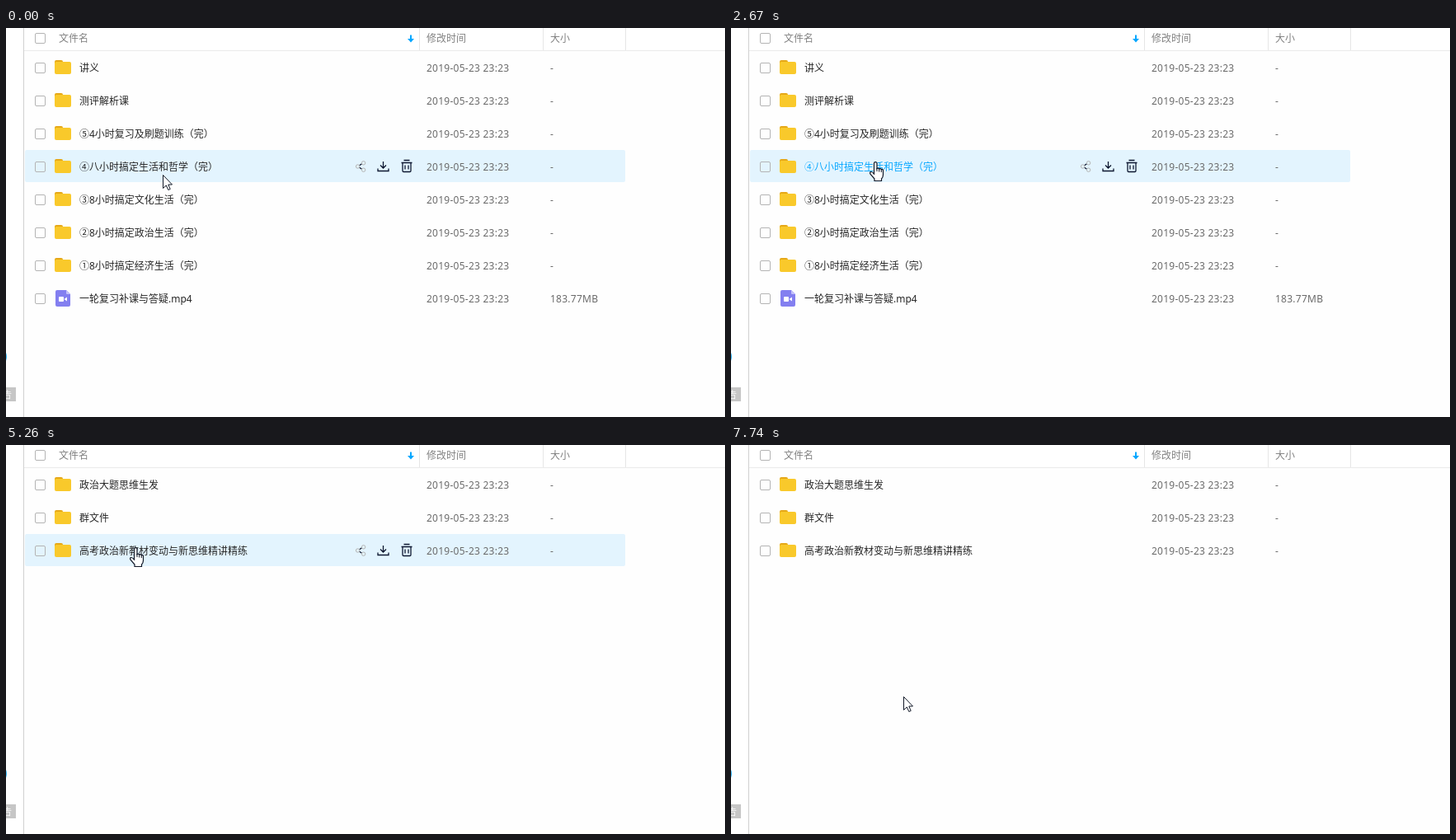
Recreate the animation shown at these times as an HTML page with a canvas. Size 872x472 px, loop 8 s.

```html
<!DOCTYPE html>
<html lang="zh-CN">
<head>
<meta charset="utf-8">
<style>
html, body { margin: 0; width: 100%; height: 100%; overflow: hidden; background: #fff; }
canvas { display: block; }
</style>
</head>
<body>
<canvas id="stage" width="872" height="472"></canvas>
<script>
const ctx = document.getElementById('stage').getContext('2d', { alpha: false });
const LOOP = 8000;
const FONT = '"Noto Sans", "Noto Sans CJK SC", "Noto Sans CJK", sans-serif';
const BLUE = '#06a7ff', GREY = '#6b6b6b', INK = '#0d1730';

// One line per entry; entries with a size are videos, the others folders.
const parse = text => text.trim().split('\n').map(line => {
  const [name, size] = line.split('|');
  return { name, size };
});
const course = parse(`
讲义
测评解析课
⑤4小时复习及刷题训练（完）
④八小时搞定生活和哲学（完）
③8小时搞定文化生活（完）
②8小时搞定政治生活（完）
①8小时搞定经济生活（完）
一轮复习补课与答疑.mp4|183.77MB`);
const culture = parse(`
8.mp4|682.07MB
7.建设社会主义文化强国专题讲解.mp4|646.76MB
6.弘扬和培育民族精神专题讲解.mp4|604.60MB
5.中华文化与民族复兴专题讲解.mp4|620.83MB
4.文化创新专题讲解 .mp4|238.16MB
3.文化的继承与发展专题讲解.mp4|273.03MB
2.文化的多样性与文化传播 .mp4|221.95MB
1.文化与经济、政治文化综合讲解 .mp4|257.72MB`);
const philosophy = parse(`
8.价值观与人生价值专题讲解.mp4|612.48MB
7.历史唯物主义专题讲解.mp4|587.31MB
6.辩证否定观与创新意识讲解.mp4|540.92MB
5.唯物辩证法联系观与发展观专题讲解.mp4|598.26MB
4.认识论专题讲解.mp4|264.70MB
3.物质与意识专题讲解.mp4|281.55MB
2.哲学的基本问题讲解.mp4|236.14MB
1.生活与哲学综合讲解.mp4|249.83MB`);
const parent = parse(`
政治大题模板应用
一轮复习联报
2019岑沐川政治二轮
05.模拟题精讲
04.选择题技巧`);
const extra = parse(`
政治大题思维生发
群文件
高考政治新教材变动与新思维精讲精练`);
const lessons = parse(`
3.新思维精讲精练.mp4|318.42MB
2.新教材变动解读.mp4|296.17MB
1.高考政治备考导学.mp4|274.65MB`);
const opening = course.map((item, i) => i === 3 ? philosophy[3] : item);

// start, list, hovered row, state of that row
const views = [
  [0, course, 3], [270, course, 4], [670, course, 4, 'link'],
  [1220, culture, 4], [1620, culture, 4, 'link'],
  [2160, culture, 3], [2280, course, 3], [2670, course, 3, 'link'],
  [2790, opening, 3], [2940, philosophy, 3], [3220, philosophy, 3, 'link'],
  [3500, course, 3], [3740, course, 3, 'link'],
  [4170, parent, 3], [4410, parent, 3, 'link'], [4560, parent, 3],
  [4830, parent, 2], [4950, parent, 2, 'link'],
  [5260, extra, 2], [5380, extra, -1],
  [6440, extra, 2, 'link'], [6560, extra, 2], [6710, extra, 2, 'checked'],
  [6830, extra, 2, 'selected'], [6980, lessons, -1], [7380, extra, -1]
];

// start, left, top of the pointer
const moves = [
  [0, 190, 178], [270, 198, 212], [390, 202, 216], [670, 198, 211], [790, 196, 210],
  [1740, 194, 210], [1890, 189, 205], [2040, 182, 192], [2160, 174, 176],
  [2280, 169, 165], [2400, 168, 162],
  [4560, 160, 155], [4680, 155, 149], [4830, 155, 138], [4950, 150, 124],
  [5380, 180, 165], [5500, 204, 217], [5620, 211, 240], [5770, 210, 240],
  [6040, 205, 231], [6190, 198, 194], [6310, 193, 158], [6440, 184, 124],
  [6560, 190, 138], [6830, 194, 282], [6980, 200, 318], [7230, 198, 299],
  [7380, 202, 301], [7500, 206, 303], [7740, 209, 305]
];
const handTimes = [[670, 4560], [4950, 5380], [6440, 6560]];

const latest = (track, t) => track.findLast(entry => entry[0] <= t);

function rect(x, y, w, h, color) {
  ctx.fillStyle = color;
  ctx.fillRect(x, y, w, h);
}

function round(x, y, w, h, r, color) {
  ctx.fillStyle = color;
  ctx.beginPath();
  ctx.roundRect(x, y, w, h, r);
  ctx.fill();
}

function label(text, x, y, color, spacing = 0, size = 12) {
  ctx.font = `${size}px ${FONT}`;
  ctx.letterSpacing = spacing + 'px';
  ctx.fillStyle = color;
  ctx.fillText(text, x, y);
}

function shape(d, x, y, { fill, stroke, width = 1 }) {
  const path = new Path2D(d);
  ctx.save();
  ctx.translate(x, y);
  if (fill) { ctx.fillStyle = fill; ctx.fill(path); }
  if (stroke) { ctx.strokeStyle = stroke; ctx.lineWidth = width; ctx.stroke(path); }
  ctx.restore();
}

function checkbox(y, checked) {
  ctx.strokeStyle = '#b4b4b4';
  ctx.lineWidth = 1;
  ctx.beginPath();
  ctx.roundRect(35.5, y + .5, 12, 12, 1.5);
  ctx.stroke();
  if (checked) shape('M3 6.5l2.5 2.7 5-5.4', 35, y, { stroke: BLUE, width: 2.2 });
}

function folder(y) {
  round(59, y - 9, 10, 8, 2, '#e6a817');
  round(59, y - 7, 20, 15, 2, '#f9c92b');
}

function video(y) {
  shape('M2 0H13L18 5V18a2 2 0 0 1-2 2H2a2 2 0 0 1-2-2V2a2 2 0 0 1 2-2z', 60, y - 10, { fill: '#837ff0' });
  shape('M13 0L18 5H14a1 1 0 0 1-1-1z', 60, y - 10, { fill: '#c3c0fa' });
  round(64, y - 2, 6, 6, 1, '#fff');
  shape('M10.5 11L14 8.5V13.5z', 60, y - 10, { fill: '#fff' });
}

function actions(y) {
  const line = { stroke: INK, width: 1.3 };
  shape('M-1.4-1.2L1.6-3.2M-1.4 1.2L1.6 3.2', 430, y, line);
  for (const [x, dy] of [[426.6, 0], [433.6, -4.2], [433.6, 4.2]]) {
    ctx.beginPath();
    ctx.arc(x, y + dy, 2.2, 0, 7);
    ctx.stroke();
  }
  shape('M.5-6V2M-3-1.5L.5 2 4-1.5M-6 2.5V5.5H7V2.5', 457, y, line);
  shape('M-6-4.5H7M-3-7.5H4M-4.5-4.5V5.2q0 1.3 1.3 1.3H4.2q1.3 0 1.3-1.3V-4.5M-1.5-1.5V3.5M2.5-1.5V3.5', 485.5, y, line);
}

function header() {
  rect(21, 0, 1, 472, '#d0d0d0');
  rect(22, 27, 850, 1, '#ebebeb');
  for (const x of [501, 651, 751]) rect(x, 0, 1, 27, '#e6e6e6');
  checkbox(6);
  label('文件名', 64, 17, '#818181');
  label('修改时间', 510, 17, '#818181');
  label('大小', 660, 17, '#818181');
  shape('M-1-4.5H1V0H4L0 4.5-4 0H-1z', 491, 13, { fill: BLUE });
}

function sidebar() {
  shape('M0 0Q2.2 4 0 10z', 0, 394, { fill: '#38b8f8' });
  rect(0, 436, 12, 17, '#c6c6c6');
  label('告', -4, 449, '#fff', 0, 11);
}

function row({ name, size }, index, hovered, state) {
  const y = 48 + index * 40;
  if (hovered) {
    round(23, y - 20, 728, 39, 2, '#e3f4fe');
    if (state !== 'selected') actions(y);
  }
  checkbox(y - 6, hovered && (state === 'checked' || state === 'selected'));
  (size ? video : folder)(y);
  label(name, 89, y + 5, hovered && state === 'link' ? BLUE : '#262626');
  label('2019-05-23 23:23', 510, y + 5, GREY, .25);
  label(size || '-', 660, y + 5, GREY, .25);
}

function pointer(t) {
  const [, x, y] = latest(moves, t);
  const look = { fill: '#fff', stroke: '#111827' };
  if (handTimes.some(([from, to]) => t >= from && t < to)) {
    shape('M5.5 14V2.3a1.75 1.75 0 0 1 3.5 0V8.5a1.7 1.7 0 0 1 2.7.5a1.6 1.6 0 0 1 2.6.7a1.4 1.4 0 0 1 2.2 1.3V16q0 3-2 5V23.5H6V21L1 15.2q-1-2 .4-2.6 1.6-.5 4.1 2.4z', x, y, { ...look, width: 1.2 });
    shape('M9 8V12M11.7 9V12.5M14.3 10V13', x, y, { stroke: look.stroke });
  } else {
    shape('M.5.5V16.5L4.3 13 6.8 18.5 9.2 17.5 6.8 12H11.5z', x, y, look);
  }
}

function draw(t) {
  rect(0, 0, 872, 472, '#fff');
  rect(22, 28, 850, 444, '#fefefe');
  header();
  sidebar();
  const [, list, hover, state] = latest(views, t);
  list.forEach((item, i) => row(item, i, i === hover, state));
  pointer(t);
}

const start = performance.now();
function tick() {
  draw((performance.now() - start) % LOOP);
  requestAnimationFrame(tick);
}
tick();
</script>
</body>
</html>
```
